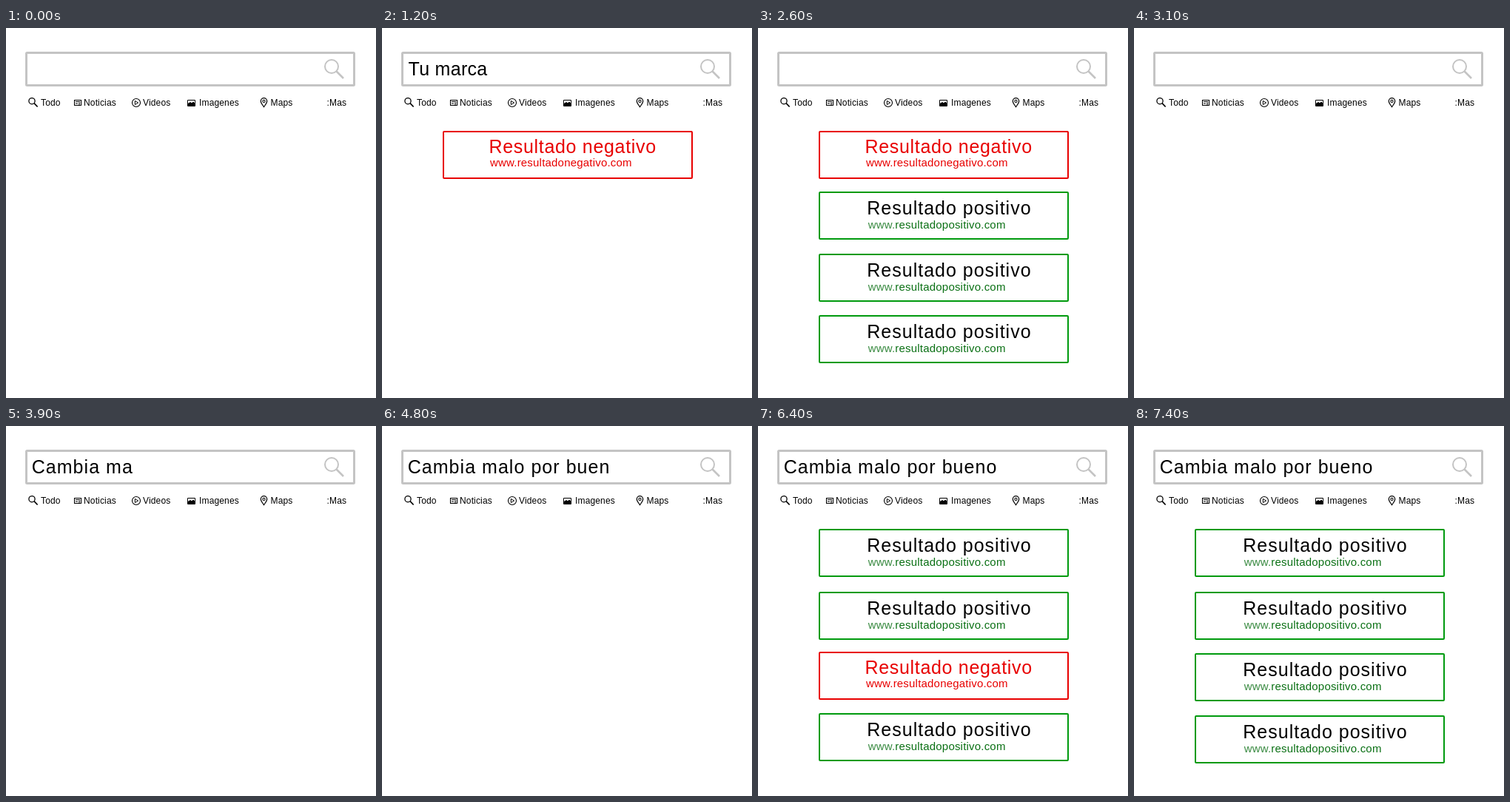
An HTML page that plays this animation: 500x500 px, repeating every 7900 ms.

```html
<!DOCTYPE html>
<html lang="es">
<head>
<meta charset="utf-8">
<title>Resultados</title>
<style>
  html, body { margin: 0; width: 100%; height: 100%; overflow: hidden; background: #fff; }
  svg { display: block; width: 100vw; height: 100vh; font-family: "Liberation Sans", Arial, sans-serif; }
  .nav { font-size: 12px; letter-spacing: .15px; }
  .icon { fill: none; stroke: #000; stroke-width: 1.3; }
  .title, #query { font-size: 25px; }
  .url { font-size: 15px; letter-spacing: .2px; }
  .card { fill: none; stroke-width: 2; }
</style>
</head>
<body>
<svg viewBox="0 0 500 500">
  <g fill="none" stroke="#c4c4c4">
    <rect x="27.5" y="33.5" width="443" height="44" rx="1" stroke-width="3"/>
    <circle cx="440" cy="52" r="9" stroke-width="2"/>
    <path d="M446.5 58.5L456 68" stroke-width="2.6"/>
  </g>
  <text id="query" y="63.8"></text>
  <g class="icon">
    <circle cx="35" cy="98.7" r="4.1"/>
    <path d="M38 101.7L42.6 106.5" stroke-width="1.7"/>
    <path d="M92.5 97.5H101.5V104.5H92.5ZM94 99.5H100M94 102H97M98 101.5H100M98 103.2H100" stroke-width="1.1"/>
    <circle cx="176" cy="101" r="5.5" stroke-width="1.1"/>
    <path d="M174.3 98.4V103.6L178.6 101Z" stroke-width="1"/>
    <path d="M245.5 97.5H255.5V105.5H245.5Z" stroke-width="1"/>
    <path d="M246 105V102.5L249 100.5L251 102L253 100L255 102V105Z" fill="#000" stroke-width="1"/>
    <path d="M348.5 106.7C346.5 103.6 344.3 101.3 344.3 98.9A4.2 4.2 0 0 1 352.7 98.9C352.7 101.3 350.5 103.6 348.5 106.7Z" stroke-width="1.2"/>
    <circle cx="348.5" cy="98.9" r="1.6" stroke-width="1.1"/>
  </g>
  <g class="nav">
    <text x="47" y="105">Todo</text>
    <text x="105" y="105">Noticias</text>
    <text x="185" y="105">Videos</text>
    <text x="261" y="105">Imagenes</text>
    <text x="357.5" y="105">Maps</text>
    <text x="433.5" y="105">:Mas</text>
  </g>
  <g id="results"></g>
</svg>
<script>
const LOOP = 7900;
const startTops = [139, 221, 305, 388];
const fixedTops = [139, 224, 307, 391];
const query = document.getElementById("query");
const results = document.getElementById("results");

const frame = color => `<rect class="card" x="83" y="1" width="336" height="63" rx="1" stroke="${color}"/>`;

const negative = frame("#e80000") + `<g fill="#e80000">
  <text class="title" x="144.5" y="30" letter-spacing=".68">Resultado negativo</text>
  <text class="url" x="146" y="48">www.resultadonegativo.com</text></g>`;

const positive = frame("#009a0e") + `
  <text class="title" x="147.3" y="31" letter-spacing="1">Resultado positivo</text>
  <text class="url" x="148.7" y="50" fill="#0a7014"><tspan fill="#3a8b42">www.</tspan>resultadopositivo.com</text>`;

// Prefix holding n letters; spaces come along with the next letter.
function typed(text, n) {
  let end = 0;
  while (n > 0) if (text[end++] !== " ") n--;
  return text.slice(0, end);
}

function queryAt(t) {
  const step = Math.floor(t / 100);
  if (t < 3100) return typed("Tu marca", Math.max(0, Math.min(7, step, 26 - step)));
  return typed("Cambia malo por bueno", Math.min(18, step - 31));
}

function resultsAt(t) {
  let count = 4, bad = 0;
  if (t < 3100) count = Math.max(0, Math.min(4, Math.floor((t - 1000) / 200)));
  else if (t < 5400) count = 0;
  else bad = Math.floor((t - 5400) / 500);
  return startTops.slice(0, count).map((top, i) =>
    `<g transform="translate(0 ${i < bad ? fixedTops[i] : top})">${i === bad ? negative : positive}</g>`
  ).join("");
}

let shown;
function draw() {
  const t = performance.now() % LOOP;
  const first = t < 3100;
  query.setAttribute("x", first ? 35.5 : 34.7);
  query.setAttribute("letter-spacing", first ? .3 : 1.04);
  query.textContent = queryAt(t);
  const markup = resultsAt(t);
  if (markup !== shown) results.innerHTML = shown = markup;
  requestAnimationFrame(draw);
}
draw();
</script>
</body>
</html>
```
